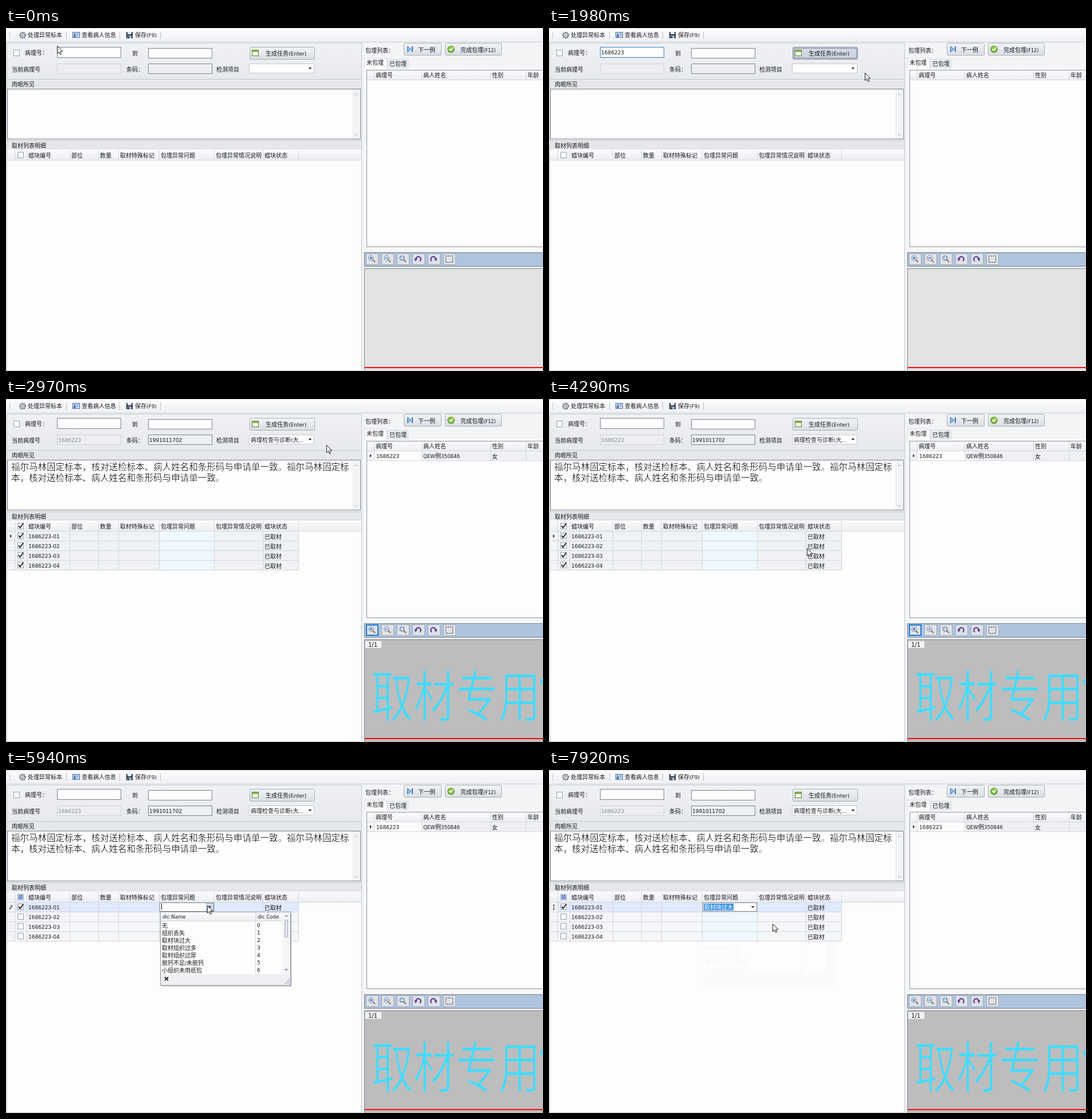
Recreate the animation shown at these times as an HTML page with a canvas. Size 937 px wide and 598 px high, loop 8 s.

```html
<!DOCTYPE html>
<html lang="zh-CN">
<head>
<meta charset="utf-8">
<title>包埋</title>
<style>
html, body { margin: 0; width: 100%; height: 100%; overflow: hidden; background: #f3f4f6; }
canvas { display: block; width: 937px; height: 598px; }
</style>
</head>
<body>
<canvas id="stage" width="937" height="598"></canvas>
<script>
const ctx = document.getElementById('stage').getContext('2d');
const STEP = 330, LOOP = 8000;
const CJK = '"Noto Sans CJK SC", "Noto Sans CJK", sans-serif';
const LATIN = '"DejaVu Sans", sans-serif';
const INK = '#16181c', RULE = '#d3d6db', EDGE = '#7b838d', BLUE = '#2b86cf';

// Pointer tip for every step of 330 ms
const pointer = [
  [89, 31], [92, 42], [92, 42], [311, 55], [430, 36], [480, 48], [551, 78], [553, 79],
  [553, 79], [559, 80], [632, 96], [484, 233], [451, 230], [450, 260], [439, 239], [342, 234],
  [343, 234], [350, 236], [351, 236], [340, 263], [321, 292], [321, 295], [321, 295], [324, 281], [390, 268]
];
const gridCols = [15, 36, 111, 161, 196, 267, 363, 448, 510];
const causes = ['无', '组织丢失', '取材块过大', '取材组织过多', '取材组织过厚', '脱钙不足/未脱钙', '小组织未用纸包'];

function fill(x, y, w, h, color) {
  ctx.fillStyle = color;
  ctx.fillRect(x, y, w, h);
}
function box(x, y, w, h, color, edge) {
  fill(x, y, w, h, color);
  ctx.strokeStyle = edge;
  ctx.lineWidth = 1;
  ctx.strokeRect(x + .5, y + .5, w - 1, h - 1);
}
function shade(y, h, top, bottom) {
  const g = ctx.createLinearGradient(0, y, 0, y + h);
  g.addColorStop(0, top);
  g.addColorStop(1, bottom);
  return g;
}
function path(points, color, width, closed) {
  ctx.beginPath();
  points.forEach(([x, y]) => ctx.lineTo(x, y));
  if (closed) ctx.closePath();
  if (width) {
    ctx.strokeStyle = color;
    ctx.lineWidth = width;
    ctx.stroke();
  } else {
    ctx.fillStyle = color;
    ctx.fill();
  }
}
function ring(x, y, r, color, width, from = 0, to = Math.PI * 2) {
  ctx.beginPath();
  ctx.arc(x, y, r, from, to);
  ctx.strokeStyle = color;
  ctx.lineWidth = width;
  ctx.stroke();
}
function disc(x, y, r, color) {
  ctx.beginPath();
  ctx.arc(x, y, r, 0, Math.PI * 2);
  ctx.fillStyle = color;
  ctx.fill();
}
// Chinese and Latin runs use their own face and size
function text(s, x, cy, color = INK, latin = 9, cjk = 10) {
  ctx.fillStyle = color;
  for (const run of s.match(/[\u3000-\uffef]+|[^\u3000-\uffef]+/g)) {
    ctx.font = run.charCodeAt(0) >= 0x3000 ? `${cjk}px ${CJK}` : `${latin}px ${LATIN}`;
    ctx.fillText(run, x, cy + 4);
    x += ctx.measureText(run).width;
  }
}
// Slim lettering: the outline in the background colour trims each stroke
function slimText(s, x, y, size, color, back, trim) {
  ctx.font = `300 ${size}px ${CJK}`;
  ctx.fillStyle = color;
  ctx.fillText(s, x, y);
  ctx.strokeStyle = back;
  ctx.lineWidth = trim;
  ctx.lineJoin = 'round';
  ctx.strokeText(s, x, y);
  ctx.lineJoin = 'miter';
}
function arrowDown(x, y, color = '#222') {
  path([[x - 3, y - 1.5], [x + 3, y - 1.5], [x, y + 1.5]], color);
}
function chevron(x, y, dir) {
  path([[x - 3, y + 1.5 * dir], [x, y - 1.5 * dir], [x + 3, y + 1.5 * dir]], '#a9adb3', 1);
}
function rowMark(x, y) {
  path([[x, y - 3], [x + 3, y], [x, y + 3]], '#222');
}
function checkbox(x, y, state) {
  box(x, y, 11, 11, '#f8f9fa', '#9aa0a9');
  if (state === 'on') path([[x + 2, y + 5], [x + 4.5, y + 8.5], [x + 10, y + 1]], '#1b1b1f', 1.8);
  if (state === 'some') box(x + 2, y + 2, 7, 7, '#7fa4e6', '#3f68bd');
}
function button(x, y, w, h, focus) {
  ctx.beginPath();
  ctx.roundRect(x + .5, y + .5, w - 1, h - 1, 2);
  ctx.fillStyle = focus ? shade(y, h, '#d6dce8', '#cbd2df') : shade(y, h, '#f3f4f7', '#d9dde3');
  ctx.fill();
  ctx.strokeStyle = focus ? '#7c8798' : '#a7adb7';
  ctx.lineWidth = 1;
  ctx.stroke();
  if (focus) ctx.strokeRect(x + 2.5, y + 2.5, w - 5, h - 5);
}

function menuBar() {
  fill(0, 0, 937, 24, shade(0, 24, '#fdfdfe', '#eef0f3'));
  fill(0, 24, 937, 1, '#cbced4');
  fill(0, 0, 937, 1, '#d6d9dd');
  fill(6, 7, 1, 11, '#c4c8ce');
  for (const x of [105, 198, 269]) fill(x, 6, 1, 13, '#b9bdc4');

  ctx.setLineDash([2, 1.5]);
  ring(29, 12.5, 5, '#59626f', 2);
  ctx.setLineDash([]);
  ring(29, 12.5, 3.8, '#6a7480', 1);
  ring(29, 12.5, 1.5, '#6a7480', 1);
  text('处理异常标本', 38, 12);

  box(116, 7, 13, 10, '#eef4fc', '#37619f');
  disc(120, 10.5, 1.6, '#2f5fa8');
  fill(118, 12.5, 4, 3, '#2f5fa8');
  for (const y of [9, 11, 13]) fill(123, y, 4, 1, '#5079b8');
  text('查看病人信息', 132, 12);

  fill(210, 7, 11, 11, '#25334a');
  fill(212, 7, 7, 4, '#e9eef5');
  fill(212, 13, 7, 5, '#aebbd0');
  fill(213, 14, 2, 4, '#25334a');
  text('保存(F9)', 225, 12);
}

function form(k, loaded) {
  fill(1, 26, 620, 63, shade(26, 63, '#f0f1f4', '#e7e9ec'));
  fill(1, 26, 620, 1, '#c6cad0');
  checkbox(13, 38);
  text('病理号：', 33, 43);
  text('到', 220, 44);
  text('当前病理号', 10, 72);
  text('条码：', 210, 72);
  text('检测项目', 367, 72);

  const focused = k >= 1 && k <= 7;
  box(89, 33, 112, 19, '#fefefe', focused ? BLUE : EDGE);
  if (k >= 2 && k <= 7) text('1686223', 91, 42);
  if (k === 1) fill(92, 36, 1, 12, '#000');
  if (k === 2 || k === 4) fill(132, 36, 1, 12, '#000');
  box(248, 35, 112, 18, '#fefefe', EDGE);
  box(89, 62, 112, 18, '#edeef0', '#ced1d6');
  box(248, 62, 112, 18, '#eeeff1', EDGE);
  box(424, 62, 114, 17, '#fefefe', '#c3c7ce');
  if (k === 7) fill(525, 63, 12, 15, '#d7e2f4');
  arrowDown(530.5, 70.5, k === 7 ? '#263f78' : '#222');
  if (loaded) {
    text('1686223', 91, 71, '#858a91');
    text('1991011702', 250, 71);
    text('病理检查与诊断(大...', 427, 71);
  }

  button(425, 33, 114, 22, k >= 5 && k <= 7);
  box(429, 38, 12, 11, '#f7fbea', '#5b7e38');
  fill(430, 39, 10, 3, '#8dba4c');
  text('生成任务(Enter)', 453, 44);
}

function notes(loaded) {
  fill(1, 89, 620, 17, '#e5e7ea');
  fill(1, 89, 620, 1, '#c3c7cd');
  text('肉眼所见', 10, 98);
  box(2, 106, 617, 88, '#fefefe', EDGE);
  fill(604, 107, 13, 86, '#f2f3f4');
  chevron(611, 116, 1);
  chevron(611, 186, -1);
  if (loaded) {
    const lines = ['福尔马林固定标本，核对送检标本、病人姓名和条形码与申请单一致。福尔马林固定标',
      '本，核对送检标本、病人姓名和条形码与申请单一致。'];
    lines.forEach((s, i) => slimText(s, 9, 124 + i * 19, 15.53, '#000', '#fefefe', .35));
  }
  fill(1, 195, 620, 17, '#e5e7ea');
  fill(1, 196, 620, 1, '#c3c7cd');
  text('取材列表明细', 10, 205);
}

function blockGrid(k, loaded) {
  fill(1, 212, 620, 386, '#fdfdfd');
  fill(1, 212, 619, 18, shade(212, 18, '#fcfcfd', '#eceef1'));
  fill(1, 230, 619, 1, RULE);
  gridCols.forEach(x => fill(x, 213, 1, 17, RULE));
  const single = k >= 17;
  checkbox(20, 216, single ? 'some' : loaded ? 'on' : '');
  ['蜡块编号', '部位', '数量', '取材特殊标记', '包埋异常问题', '包埋异常情况说明', '蜡块状态']
    .forEach((s, i) => text(s, gridCols[i + 1] + 3, 222));
  if (!loaded) return;

  for (let r = 0; r < 4; r++) {
    const y = 231 + r * 17;
    const active = single ? r === 0 : k >= 16;
    fill(2, y, 13, 16, '#f3f4f6');
    fill(16, y, 494, 16, active ? '#e1e9fc' : single ? '#f5f6f8' : '#eff1f3');
    if (!active || r) fill(268, y, 95, 16, '#eff7ff');
    fill(2, y + 16, 509, 1, RULE);
    gridCols.forEach(x => fill(x, y, 1, 16, RULE));
    checkbox(20, y + 2, !single || r === 0 ? 'on' : '');
    text('1686223-0' + (r + 1), 39, y + 8);
    text('已取材', 451, y + 9);
  }

  if (k < 17) rowMark(7, 239);
  else if (k < 23) {
    path([[6.5, 243], [7, 239.5], [9.5, 235.5], [11, 236.5], [9, 241], [6.5, 243]], '#333', 1);
  } else {
    fill(8, 236, 1, 7, '#333');
    fill(7, 235, 3, 1, '#333');
    fill(7, 243, 3, 1, '#333');
  }
  if (k >= 16) editor(k);
}

function editor(k) {
  box(268, 231, 95, 16, '#fefefe', '#858c96');
  if (k >= 17 && k <= 22) box(349, 232, 13, 14, '#d5e0f3', '#a4b3cc');
  arrowDown(355.5, 239);
  if ([17, 18, 20, 21].includes(k)) fill(271, 233, 1, 11, '#000');
  if (k === 24) fill(270, 233, 52, 12, '#3d95e8');
  if (k >= 23) text('取材块过大', 271, 239, k === 24 ? '#fff' : INK);
}

function popup(k) {
  fill(272, 250, 227, 128, 'rgba(60,66,76,.12)');
  fill(272, 250, 226, 127, 'rgba(60,66,76,.2)');
  box(269, 247, 228, 129, '#fdfdfd', '#8b929c');
  fill(270, 248, 212, 15, shade(248, 15, '#fcfcfd', '#eceef1'));
  fill(270, 263, 212, 1, RULE);
  text('dic Name', 273, 255, INK, 8.6);
  text('dic Code', 439, 255, INK, 8.6);
  const hot = k === 19 ? 0 : k >= 20 && k <= 22 ? 2 : -1;
  if (hot >= 0) fill(270, 264 + hot * 13, 212, 13, '#dfe8fb');
  ctx.save();
  ctx.beginPath();
  ctx.rect(270, 264, 212, 92);
  ctx.clip();
  causes.forEach((s, i) => {
    text(s, 272, 271 + i * 13);
    text(String(i), 438, 270 + i * 13);
  });
  ctx.restore();
  fill(435, 248, 1, 108, RULE);
  fill(482, 248, 14, 108, '#f4f5f6');
  arrowDown(489, 348.5, '#777c84');
  path([[486, 255.5], [492, 255.5], [489, 252.5]], '#777c84');
  box(486, 261, 6, 31, '#e3e5e9', '#a7acb4');
  fill(270, 356, 226, 19, '#eff0f3');
  path([[277, 361], [283, 367]], '#222', 1.8);
  path([[283, 361], [277, 367]], '#222', 1.8);
  for (const d of [3, 6, 9]) path([[495 - d, 373], [495, 373 - d]], '#999ea6', 1);
}

function ghost() {
  ctx.save();
  ctx.beginPath();
  ctx.rect(268, 299, 234, 80);
  ctx.clip();
  fill(269, 299, 231, 79, '#f9fafb');
  fill(270, 299, 213, 57, '#fdfdfe');
  ctx.globalAlpha = .035;
  causes.slice(3).forEach((s, i) => {
    text(s, 272, 310 + i * 13);
    text(String(i + 3), 438, 310 + i * 13);
  });
  ctx.restore();
}

function listPanel(loaded) {
  text('包埋列表：', 627, 39);
  button(694, 26, 66, 22);
  path([[700.5, 32], [707, 37], [700.5, 42]], '#8fbdec');
  path([[700.5, 32], [707, 37], [700.5, 42]], '#3674b8', 1, true);
  fill(708, 32, 2, 10, '#3674b8');
  text('下一例', 719, 38);
  button(766, 26, 99, 22);
  disc(776.5, 37, 6.3, '#5f9a2a');
  disc(776.5, 36.5, 5, '#8bc34a');
  path([[773.5, 36.5], [776, 39], [780, 34]], '#fff', 1.8);
  text('完成包埋(F12)', 793, 38, INK, 8.2);

  box(666, 54, 36, 16, '#eceef1', RULE);
  fill(625, 70, 312, 321, '#f7f8f9');
  box(625, 52, 40, 19, '#fcfcfd', RULE);
  fill(626, 70, 38, 1, '#fcfcfd');
  text('未包埋', 629, 60);
  text('已包埋', 669, 62);

  box(629, 73, 320, 309, '#fdfdfd', '#8d949d');
  fill(630, 74, 307, 16, shade(74, 16, '#fcfcfd', '#eceef1'));
  fill(630, 90, 307, 1, RULE);
  const cols = [642, 725, 845, 907];
  if (loaded) {
    fill(630, 91, 12, 16, '#f3f4f6');
    fill(726, 91, 211, 16, '#eff0f3');
    fill(630, 107, 307, 1, RULE);
    rowMark(635, 99);
    text('1686223', 646, 99);
    text('QEW例350846', 728, 99, INK, 8.7);
    text('女', 848, 100);
  }
  cols.forEach(x => fill(x, 74, 1, loaded ? 33 : 16, RULE));
  ['病理号', '病人姓名', '性别', '年龄'].forEach((s, i) => text(s, cols[i] + 3, 82));
}

function lens(x, y, sign) {
  path([[x + 2, y + 2], [x + 6, y + 6]], '#94723f', 2);
  disc(x - 1, y - 1, 4, '#e8f1fb');
  ring(x - 1, y - 1, 4, '#6f87a8', 1.2);
  if (sign === 'fit') {
    for (const dx of [-3, 1]) for (const dy of [-3, 1]) fill(x + dx - .5, y + dy - .5, 2, 2, '#5575a6');
    return;
  }
  fill(x - 3, y - 1.5, 4, 1.4, '#2e4fa0');
  if (sign === 'in') fill(x - 1.7, y - 3, 1.4, 4, '#2e4fa0');
}
function turn(x, y, dir) {
  ctx.save();
  ctx.translate(x, y);
  ctx.scale(dir, 1);
  ring(.5, 0, 4.3, '#5a3d95', 2.2, Math.PI * 1.05, Math.PI * 2.3);
  path([[-6.5, -1.5], [-1, -1], [-4.5, 4]], '#5a3d95');
  ctx.restore();
}

function viewer(k, loaded) {
  box(625, 391, 320, 25, '#b0c4de', '#77808c');
  for (let i = 0; i < 6; i++) {
    const x = 628 + i * 27;
    box(x, 393, 22, 20, '#dfe2e7', '#a3abb7');
    if (i === 0 && loaded && k < 16) {
      ctx.strokeStyle = '#1a7ad4';
      ctx.lineWidth = 2;
      ctx.strokeRect(x + 1, 394, 20, 18);
    }
  }
  lens(638, 402, 'in');
  lens(665, 402, 'out');
  lens(692, 402, 'fit');
  turn(719, 403, 1);
  turn(746, 403, -1);
  ctx.setLineDash([2, 1.5]);
  ctx.strokeStyle = '#222';
  ctx.lineWidth = 1;
  ctx.strokeRect(767.5, 397.5, 12, 11);
  ctx.setLineDash([]);

  const live = k >= 7;
  const back = live ? '#bdbdbd' : '#e3e3e3';
  box(625, 419, 320, 190, back, '#7e858e');
  if (live) {
    ctx.save();
    ctx.translate(637, 554);
    ctx.scale(1, 1.31);
    slimText('取材专用', 0, 0, 74, '#40dcff', back, 1.7);
    ctx.restore();
    path([[938, 487], [933, 497]], '#40dcff', 4);
  }
  fill(626, 591, 311, 2, '#fa0d0d');
  if (loaded) {
    fill(627, 422, 28, 12, '#f1f1f2');
    text('1/1', 632, 428, INK, 10);
  }
}

function drawPointer(k) {
  const [x, y] = pointer[k];
  if (k === 1 || k === 2) {
    fill(x, y - 7, 1, 15, '#222');
    fill(x - 2, y - 8, 5, 1, '#222');
    fill(x - 2, y + 8, 5, 1, '#222');
    return;
  }
  const shape = [[0, 0], [0, 13], [3, 10.3], [5, 15], [7.2, 14], [5.2, 9.5], [9.3, 9.3]]
    .map(([a, b]) => [x + a + .5, y + b + .5]);
  path(shape, '#fff');
  path(shape, '#1a1a1a', 1, true);
}

function draw(t) {
  const k = Math.min(24, Math.floor(t / STEP));
  const loaded = k >= 8;
  fill(0, 0, 937, 598, '#f3f4f6');
  menuBar();
  form(k, loaded);
  notes(loaded);
  blockGrid(k, loaded);
  fill(1, 26, 1, 572, '#c3c7cd');
  fill(620, 26, 1, 572, '#c3c7cd');
  fill(1, 597, 620, 1, '#c3c7cd');
  listPanel(loaded);
  viewer(k, loaded);
  if (k >= 18 && k <= 22) popup(k);
  if (k >= 23) ghost();
  drawPointer(k);
}

const start = performance.now();
function tick() {
  draw((performance.now() - start) % LOOP);
  requestAnimationFrame(tick);
}
tick();
</script>
</body>
</html>
```
